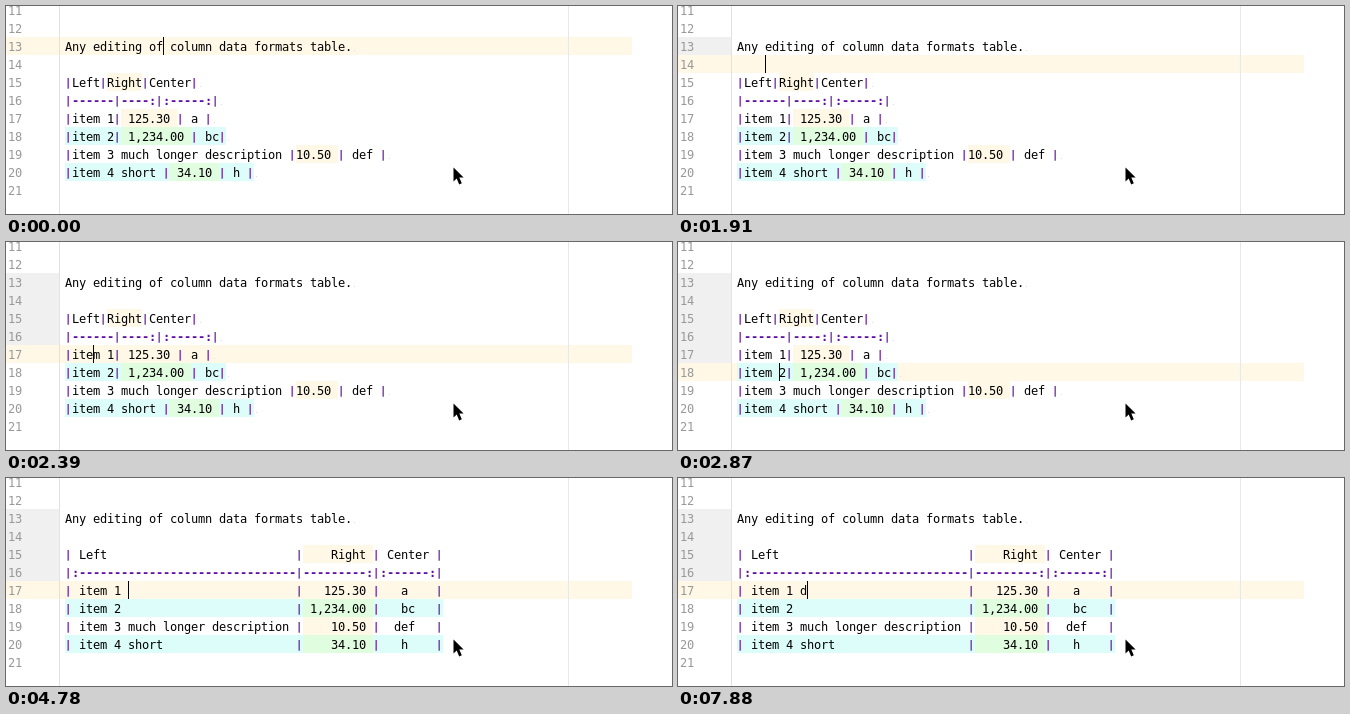
These frames come from a looping animation (666x208 px, 8 s). An HTML page:

```html
<!DOCTYPE html>
<html lang="en">
<head>
<meta charset="utf-8">
<title>Table formatting in an editor</title>
<style>
  html, body { margin: 0; width: 100%; height: 100%; overflow: hidden; background: #fff; }
  svg { display: block; width: 666px; height: 208px; }
  text {
    font: 12px "DejaVu Sans Mono", "Liberation Mono", monospace;
    letter-spacing: calc(7px - 1ch);
    white-space: pre;
  }
  .num { fill: #999; }
  .rule { font-weight: bold; fill: #5f0f9f; }
  .bar { font-weight: bold; font-size: 10.5px; fill: #5f0f9f; }
</style>
</head>
<body>
<svg viewBox="0 0 666 208">
  <g id="view"></g>
  <path d="M447.5 161.5V175.6L450.7 172.6L453.2 178.4L455.8 177.3L453.3 171.6H457.6Z"
        fill="#000" stroke="#fff" stroke-width="1" paint-order="stroke"/>
</svg>
<script>
const LOOP = 8000, LEFT = 59, CHAR = 7, LINE = 18;
const CREAM = '#fff8e7', CYAN = '#dcfdfa', GREEN = '#e0fddf', GREY = '#f0f0f0';
const view = document.getElementById('view');
const top_ = line => 31 + (line - 13) * LINE;
const left = col => LEFT + col * CHAR;

const raw = [
  '|Left|Right|Center|',
  '|------|----:|:-----:|',
  '|item 1| 125.30 | a |',
  '|item 2| 1,234.00 | bc|',
  '|item 3 much longer description |10.50 | def |',
  '|item 4 short | 34.10 | h |'
];

function center(s, width) {
  const before = Math.floor((width - s.length) / 2);
  return (' '.repeat(before) + s).padEnd(width);
}

function format(row, i) {
  if (i === 1) return `|:${'-'.repeat(31)}|${'-'.repeat(9)}:|:${'-'.repeat(6)}:|`;
  const [a, b, c] = row.split('|').slice(1, 4).map(s => s.trim());
  return `| ${a.padEnd(30)} | ${b.padStart(8)} | ${center(c, 6)} |`;
}

const withItem = (rows, from, to) => rows.map(r => r.replace(from, to));
const neat = raw.map(format);
const tables = {
  raw,
  spaced: withItem(raw, 'item 1|', 'item 1 |'),
  neat,
  typed: withItem(neat, 'item 1 ', 'item 1 d '),
  done: withItem(neat, 'item 1  ', 'item 1 d')
};

// time, caret line, caret column, caret shown, table, last grey gutter line
const steps = [
  [0, 13, 14, 1, 'raw', 0],
  [110, 13, 13, 1, 'raw', 0],
  [230, 13, 12, 1, 'raw', 0],
  [710, 13, 10, 1, 'raw', 0],
  [830, 13, 7, 1, 'raw', 0],
  [950, 13, 4, 1, 'raw', 0],
  [1790, 14, 4, 1, 'raw', 0],
  [1910, 14, 4, 1, 'raw', 13],
  [2030, 15, 4, 1, 'raw', 14],
  [2150, 16, 4, 1, 'raw', 15],
  [2390, 17, 4, 1, 'raw', 16],
  [2510, 18, 4, 1, 'raw', 17],
  [2750, 18, 5, 1, 'raw', 17],
  [2870, 18, 6, 1, 'raw', 17],
  [3110, 18, 7, 1, 'raw', 17],
  [3350, 17, 7, 1, 'raw', 16],
  [4310, 17, 7, 0, 'raw', 16],
  [4540, 17, 8, 0, 'spaced', 16],
  [4780, 17, 9, 1, 'neat', 16],
  [5730, 17, 9, 0, 'neat', 16],
  [6210, 17, 9, 1, 'neat', 16],
  [6690, 17, 9, 0, 'neat', 16],
  [7280, 17, 9, 1, 'neat', 16],
  [7760, 17, 10, 1, 'typed', 16],
  [7880, 17, 10, 1, 'done', 16]
];

const rect = (x, y, w, h, fill) =>
  `<rect x="${x}" y="${y}" width="${w}" height="${h}" fill="${fill}"/>`;
const text = (x, line, s, cls = '', dy = 0) =>
  `<text x="${x}" y="${top_(line) + 14 + dy}" class="${cls}">${s}</text>`;
const endMark = (line, length) => rect(left(length) + 2, top_(line) + 13, 1, 1, '#ddd');

function tint(row, i) {
  if (i === 1) return '';
  const y = top_(15 + i), from = row.indexOf('|', 1) + 1, to = row.indexOf('|', from);
  const striped = i === 3 || i === 5;
  return (striped ? rect(LEFT, y, row.length * CHAR, LINE, CYAN) : '') +
    rect(left(from), y, (to - from) * CHAR, LINE, striped ? GREEN : CREAM);
}

function cells(row, i) {
  let out = '';
  for (const m of row.matchAll(/\||[^|]+/g)) {
    const bar = m[0] === '|';
    const s = m[0].trimStart(), col = m.index + m[0].length - s.length;
    out += text(left(col), 15 + i, s, bar ? 'bar' : i === 1 ? 'rule' : '', bar ? -1.5 : 0);
  }
  return out;
}

function draw([, line, col, shown, name, grey]) {
  const rows = tables[name], note = 'Any editing of column data formats table.';
  let out = '';
  if (grey) out += rect(0, top_(13), 53, (grey - 12) * LINE, GREY);
  out += rect(0, top_(line), 626, LINE, CREAM);
  out += rows.map(tint).join('');
  out += rect(53, 0, 1, 208, '#e2e2e2') + rect(562, 0, 1, 208, '#e8e8e8');
  for (let n = 11; n <= 21; n++) out += text(2, n, n, 'num');
  out += text(LEFT, 13, note) + endMark(13, note.length);
  out += rows.map(cells).join('');
  if (rows[0] === raw[0]) out += rows.map((r, i) => endMark(15 + i, r.length)).join('');
  if (shown) out += rect(left(col), top_(line), 1, LINE, '#000');
  view.innerHTML = out;
}

const start = performance.now();
let current;
function tick() {
  const t = Math.max(0, performance.now() - start) % LOOP;
  const step = steps.findLast(s => s[0] <= t);
  if (step !== current) draw(current = step);
  requestAnimationFrame(tick);
}
tick();
</script>
</body>
</html>
```
